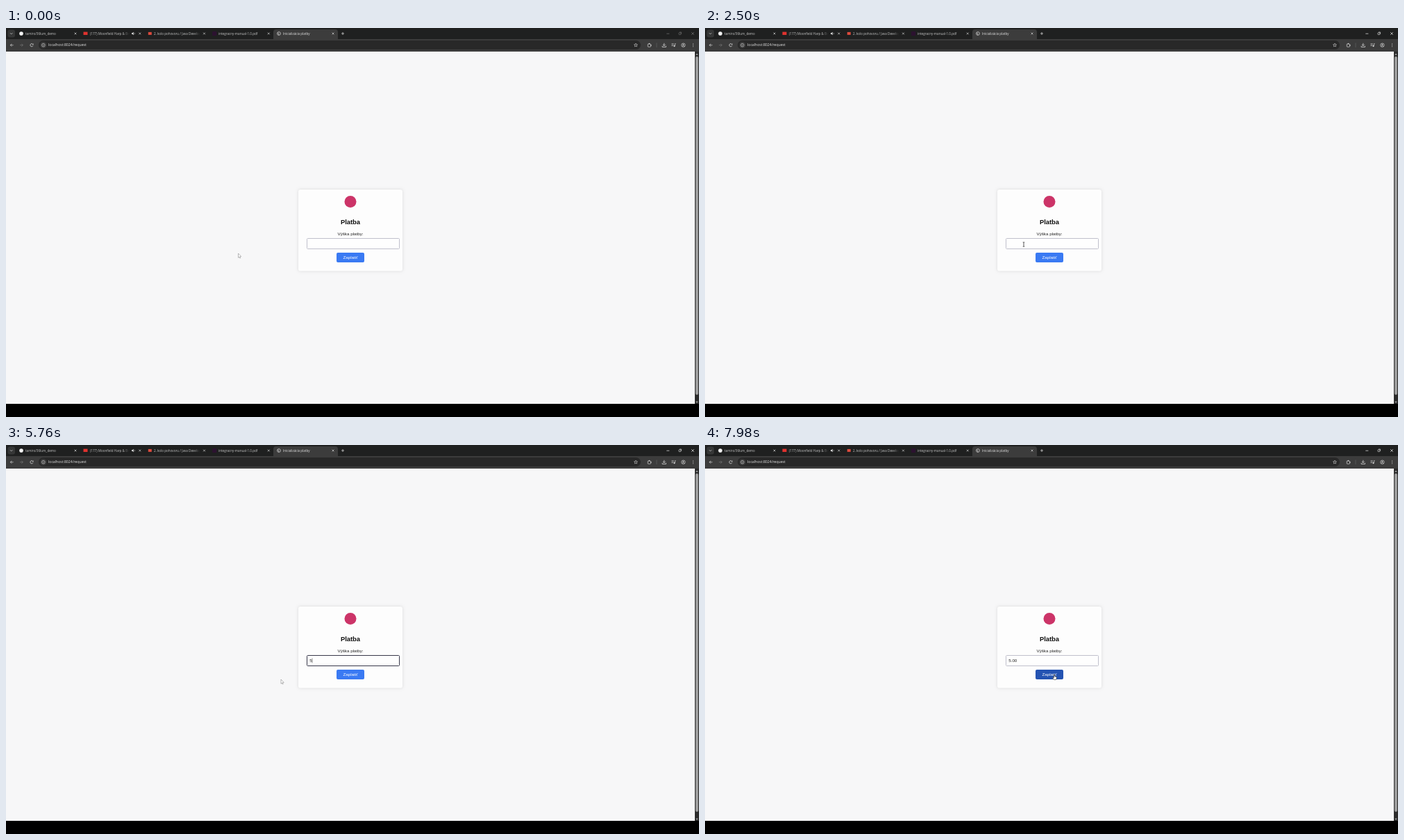
These frames come from a looping animation (998x561 px, 8000 ms). An HTML page with a canvas:

```html
<!DOCTYPE html>
<html lang="sk">
<head>
<meta charset="utf-8">
<title>Platba</title>
<style>
html, body { margin: 0; width: 100%; height: 100%; overflow: hidden; background: #000; }
canvas { display: block; width: 998px; height: 561px; }
</style>
</head>
<body>
<canvas id="stage"></canvas>
<script>
const W = 998, H = 561, LOOP = 8000;
const UI = '"Open Sans", sans-serif';
const PAGE = 'Arial, "Liberation Sans", sans-serif';
const canvas = document.getElementById('stage');
const ctx = canvas.getContext('2d');
const ratio = window.devicePixelRatio || 1;
canvas.width = W * ratio;
canvas.height = H * ratio;

const FOCUS = 3500, BLUR = 6700, ACTIVE = 1340;
const KEYS = [[5660, '5'], [6000, '5.'], [6150, '5.0'], [6300, '5.00']];

// Pointer stops: time, x, y. The pointer is away from the page in between.
const OUT = [[0, 334.5, 325], [260, 334.5, 325], [780, 230, 545]];
const BACK = [[1260, -8, 300], [1700, 300, 306], [2300, 459, 312], [2900, 459, 312],
  [3350, 458.5, 311], [4600, 458.5, 311], [5250, 396, 338], [6050, 396, 338],
  [6350, 424, 345.5], [6640, 452, 341], [6980, 452, 341], [7600, 503, 331], [LOOP, 503, 331]];

function box(x, y, w, h, color, r = 0) {
  ctx.fillStyle = color;
  ctx.beginPath();
  ctx.roundRect(x, y, w, h, r);
  ctx.fill();
}

function frame(x, y, w, h, color, width, r = 0) {
  ctx.strokeStyle = color;
  ctx.lineWidth = width;
  ctx.beginPath();
  ctx.roundRect(x, y, w, h, r);
  ctx.stroke();
}

function disc(x, y, r, color) {
  ctx.fillStyle = color;
  ctx.beginPath();
  ctx.arc(x, y, r, 0, Math.PI * 2);
  ctx.fill();
}

function ring(x, y, r, color, width = 0.7, from = 0, to = Math.PI * 2) {
  ctx.strokeStyle = color;
  ctx.lineWidth = width;
  ctx.beginPath();
  ctx.arc(x, y, r, from, to);
  ctx.stroke();
}

function line(points, color, width = 0.7) {
  ctx.strokeStyle = color;
  ctx.lineWidth = width;
  ctx.beginPath();
  points.forEach(([x, y], i) => i ? ctx.lineTo(x, y) : ctx.moveTo(x, y));
  ctx.stroke();
}

function shape(points, fill, edge, width = 0.6) {
  ctx.beginPath();
  points.forEach(([x, y]) => ctx.lineTo(x, y));
  ctx.closePath();
  ctx.fillStyle = fill;
  ctx.fill();
  if (!edge) return;
  ctx.strokeStyle = edge;
  ctx.lineWidth = width;
  ctx.stroke();
}

function label(text, x, y, font, color, align = 'left') {
  ctx.font = font;
  ctx.textAlign = align;
  ctx.fillStyle = color;
  ctx.fillText(text, x, y);
}

function cross(x, y, r, color) {
  line([[x - r, y - r], [x + r, y + r]], color);
  line([[x + r, y - r], [x - r, y + r]], color);
}

function tabTitle(text, x, right, color = '#c4c4c4') {
  const fade = ctx.createLinearGradient(right - 8, 0, right, 0);
  fade.addColorStop(0, color);
  fade.addColorStop(1, 'rgba(196,196,196,0)');
  label(text, x, 9.8, '4.6px ' + UI, fade);
}

function tabs(active) {
  box(0, 0, W, 17, '#1f2020');
  box(2.5, 2.5, 10.5, 11, '#363737', 3);
  line([[6, 7.2], [7.7, 8.9], [9.4, 7.2]], '#ddd');
  box(385, 2, 93, 18, '#3c3c3c', 4);

  disc(22, 8, 2.8, '#f2f2f2');
  tabTitle('tamiro/36lum_demo', 28, 92);
  box(111.5, 5.6, 6, 4.4, '#e0322e');
  tabTitle('(177) Moonfield Harp & Bells', 121, 177);
  box(204.8, 5.9, 5, 4, '#dc4a3d');
  tabTitle('2. kolo pohovoru / Java Developer', 213, 279);
  box(297.2, 5, 6, 6, '#2c1230');
  tabTitle('integracny-manual-1.0.pdf', 306, 370);
  ring(393, 8, 2.4, '#d0d0d0', 0.8);
  line([[391.2, 7], [393, 8], [392.5, 10]], '#d0d0d0');
  tabTitle('Inicializácia platby', 399, 462, '#e2e2e2');

  shape([[181, 7], [182.2, 7], [183.8, 5.8], [183.8, 10.2], [182.2, 9], [181, 9]], '#ccc');
  ring(183.8, 8, 1.6, '#ccc', 0.5, -0.9, 0.9);
  for (let i = 0; i < 5; i++) cross(100 + i * 92.75, 8, 1.4, '#d6d6d6');
  line([[483, 8], [487, 8]], '#ddd');
  line([[485, 6], [485, 10]], '#ddd');

  const control = active ? '#f0f0f0' : '#777';
  line([[951.3, 8.2], [955.3, 8.2]], control);
  frame(969, 6.8, 2.8, 2.8, control, 0.6, 0.5);
  line([[970, 6], [972.6, 6], [972.6, 8.7]], control, 0.6);
  cross(989, 8, 1.8, control);
}

function toolbar() {
  const ink = '#d8d8d8', dim = '#777';
  box(0, 16, W, 18, '#3c3c3c');
  box(47, 18, 867, 13, '#282828', 6.5);

  line([[10.6, 24.7], [6.3, 24.7]], ink);
  line([[8.3, 22.7], [6.3, 24.7], [8.3, 26.7]], ink);
  line([[20, 24.7], [24.4, 24.7]], dim);
  line([[22.4, 22.7], [24.4, 24.7], [22.4, 26.7]], dim);
  ring(37, 24.7, 2.1, ink, 0.8, 0.4, 5.6);
  shape([[37.6, 24.2], [39.5, 24.2], [39.5, 22.2]], ink);

  disc(53.8, 24.7, 4.6, '#3c3c3c');
  ring(53.8, 24.7, 2.3, ink, 0.6);
  line([[53.8, 24.5], [53.8, 26]], ink, 0.6);
  line([[53.8, 23.3], [53.8, 23.9]], ink, 0.6);
  label('localhost:8024/request', 61, 26.4, '5.15px ' + UI, '#e3e3e3');

  const star = Array.from({ length: 10 }, (_, i) => {
    const a = i * Math.PI / 5 - Math.PI / 2, r = i % 2 ? 1.2 : 2.6;
    return [907 + r * Math.cos(a), 24.7 + r * Math.sin(a)];
  });
  shape(star, '#282828', ink);

  frame(924.3, 23, 4.2, 4.2, ink, 0.7, 0.6);
  disc(926.4, 22.6, 0.8, ink);
  disc(928.9, 25, 0.8, ink);
  line([[937, 21.5], [937, 28]], '#66686a', 0.6);
  line([[947.8, 21.8], [947.8, 25.6]], ink, 0.8);
  line([[945.9, 23.8], [947.8, 25.7], [949.7, 23.8]], ink, 0.8);
  line([[945.1, 25.8], [945.1, 27.4], [950.5, 27.4], [950.5, 25.8]], ink, 0.8);
  for (let i = 0; i < 3; i++) line([[958.5, 22.7 + i * 1.5], [961.7 - (i > 1 ? 1 : 0), 22.7 + i * 1.5]], ink, 0.6);
  line([[964.7, 22.7], [963.3, 22.7], [963.3, 26]], ink, 0.7);
  disc(962.5, 26.1, 1.1, ink);
  ring(975.4, 24.7, 2.7, ink, 0.7);
  disc(975.4, 23.9, 0.9, ink);
  ring(975.4, 27.2, 1.7, ink, 0.7, Math.PI * 1.1, Math.PI * 1.9);
  for (let i = -1; i < 2; i++) disc(989.6, 24.7 + i * 2, 0.55, ink);
}

function page() {
  box(0, 34, 992, 508, '#f7f7f8');
  box(992, 34, 6, 508, '#2c2c2c');
  box(993, 41, 4, 488, '#9d9d9d', 2);
  shape([[993.3, 39], [995, 36.5], [996.7, 39]], '#9d9d9d');
  shape([[993.3, 538.5], [995, 541], [996.7, 538.5]], '#9d9d9d');
  box(0, 542, W, 19, '#000');
}

function form(t, hover) {
  ctx.save();
  ctx.shadowColor = 'rgba(0,0,0,.12)';
  ctx.shadowBlur = 4 * ratio;
  box(421, 233, 150, 117.4, '#fdfdfd', 3);
  ctx.restore();

  disc(496, 250.5, 8.5, '#cc3468');
  label('Platba', 496, 282.8, 'bold 9.33px ' + PAGE, '#111', 'center');
  label('Výška platby:', 496, 298.6, '6.22px ' + PAGE, '#222', 'center');

  const focused = t >= FOCUS && t < BLUR;
  box(433.5, 303.5, 133, 15, '#fefefe', 1);
  frame(433.5, 303.5, 133, 15, focused ? '#38384a' : '#c0c0cc', 1, 1);

  const key = KEYS.filter(([at]) => at <= t).pop();
  const value = key ? key[1] : '';
  label(value, 437.2, 313, '6.22px ' + PAGE, '#222');
  const since = t - (key ? key[0] : FOCUS);
  if (focused && Math.floor(since / 530) % 2 === 0) {
    const x = 437.5 + ctx.measureText(value).width;
    line([[x, 307.5], [x, 314.3]], '#444', 0.6);
  }

  box(476, 324, 40, 14, hover ? '#2453b2' : '#3a7af3', 2);
  label('Zaplatiť', 496, 333.4, '6.22px ' + PAGE, '#fff', 'center');
}

function along(stops, t) {
  const i = stops.findIndex(([at]) => at > t);
  if (i < 1) return null;
  const [t0, x0, y0] = stops[i - 1], [t1, x1, y1] = stops[i];
  const p = (t - t0) / (t1 - t0), e = p * p * (3 - 2 * p);
  return [x0 + (x1 - x0) * e, y0 + (y1 - y0) * e];
}

function inside([x, y], left, top, right, bottom) {
  return x >= left && x <= right && y >= top && y <= bottom;
}

function arrow() {
  shape([[0, 0], [0, 6.3], [1.4, 5], [2.3, 7], [3.2, 6.6], [2.3, 4.7], [4.2, 4.5]], '#fff', '#8c8c8c');
}

function beam() {
  line([[-1.3, -3], [1.3, -3]], '#333', 0.7);
  line([[0, -3], [0, 3.2]], '#333', 0.8);
  line([[-1.3, 3.2], [1.3, 3.2]], '#333', 0.7);
}

function hand() {
  shape([[-0.5, 0], [0.5, 0], [0.7, 2.7], [3.2, 3.4], [3.4, 5], [2.6, 7.4],
    [-0.7, 7.4], [-2.5, 4.6], [-1.9, 4], [-0.7, 5]], '#fff', '#222');
}

function pointer(at, hover) {
  ctx.save();
  ctx.translate(at[0], at[1]);
  if (hover) hand();
  else if (inside(at, 433, 303, 567, 319)) beam();
  else arrow();
  ctx.restore();
}

function draw(now) {
  const t = now % LOOP;
  const at = along(OUT, t) || along(BACK, t);
  const hover = !!at && inside(at, 476, 324, 516, 338);
  ctx.setTransform(ratio, 0, 0, ratio, 0, 0);
  page();
  tabs(t >= ACTIVE);
  toolbar();
  form(t, hover);
  if (at) pointer(at, hover);
  requestAnimationFrame(draw);
}

draw(0);
</script>
</body>
</html>
```
